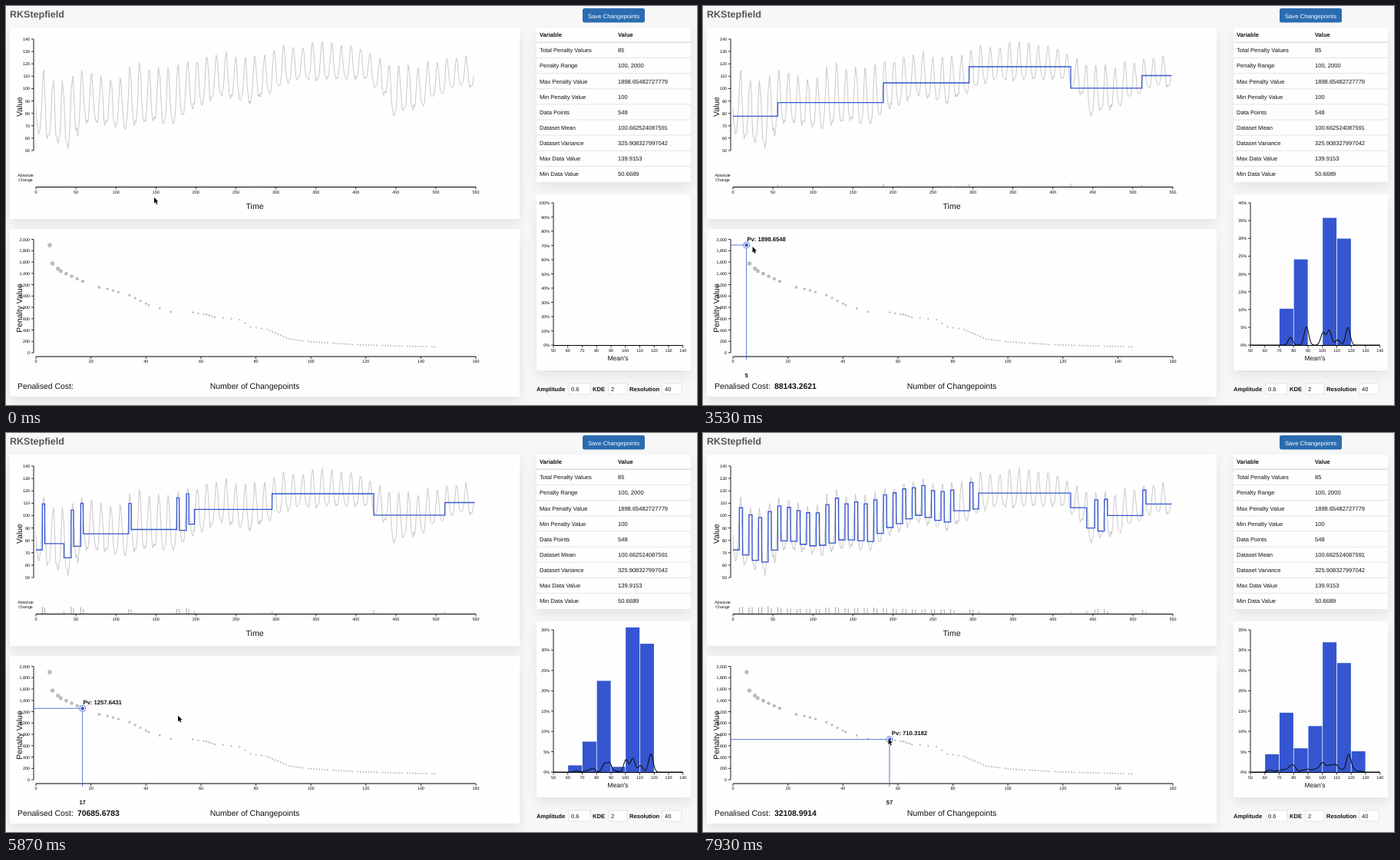
An HTML page with a canvas that plays this animation: 900 px wide and 519 px high, repeating every 8000 ms.

```html
<!DOCTYPE html>
<html lang="en">
<head>
<meta charset="utf-8">
<title>Changepoint explorer</title>
<style>
  html, body { margin: 0; width: 100%; height: 100%; overflow: hidden; background: #f7f7f7; }
  canvas { display: block; width: 900px; height: 519px; }
</style>
</head>
<body>
<canvas id="stage" width="900" height="519"></canvas>
<script>
const LOOP = 8000;
const BLUE = '#3556d0', INK = '#111', GREY = '#bbb';
const COUNT = 548;

const timeX = i => 39 + i * 1.0425;
const valueY = v => 43 + (140 - v) * 1.615;
const countX = n => 39 + n * 3.583;
const penaltyY = p => 451 - p * .07375;
const meanX = v => 713 + (v - 50) * 1.875;

const noise = i => {
  const s = Math.sin(i * 12.9898) * 43758.5453;
  return s - Math.floor(s) - .5;
};
const mean = list => list.reduce((a, b) => a + b, 0) / list.length;

// Linear interpolation between key points, held beyond both ends
function at(points, x, column = 1) {
  let i = points.findIndex(p => p[0] > x);
  if (i < 0) i = points.length;
  const a = points[Math.max(0, i - 1)], b = points[Math.min(i, points.length - 1)];
  const u = a === b ? 0 : (x - a[0]) / (b[0] - a[0]);
  return a[column] + (b[column] - a[column]) * u;
}

// Envelope of the yearly cycle: [year, high, low]
const ENVELOPE = [[0, 111, 64], [3, 103, 52], [5, 113, 74], [9, 107, 69], [11, 118, 74], [14, 113, 73],
  [16, 124, 87], [19, 131, 97], [22, 126, 92], [25, 133, 103], [27, 138, 108], [34, 136, 109],
  [36, 123, 98], [37, 121, 81], [40, 118, 90], [43, 126, 103]];
const REGIMES = [0, 56, 188, 295, 422, 511];
const REGIME_MEANS = [77.8, 88.9, 104.7, 117.7, 100.4, 110.6];

const series = Array.from({ length: COUNT }, (_, i) => {
  const month = (i + 3) % 12, year = Math.floor((i + 3) / 12);
  const peak = month < 6 ? year : year + 1;
  const high = at(ENVELOPE, peak, 1) + 5 * noise(peak), low = at(ENVELOPE, year, 2);
  const season = ((1 + Math.cos((month - .5) * Math.PI / 6)) / 2) ** 2;
  return low + (high - low) * (season + .16 * noise(i + 99));
});

// One constant level per stretch between changepoints
function fit(breaks) {
  const starts = [0, ...breaks].sort((a, b) => a - b);
  return starts.map((from, i) => {
    const to = starts[i + 1] ?? COUNT;
    return { from, to, level: mean(series.slice(from, to)) };
  });
}

fit(REGIMES.slice(1)).forEach(({ from, to, level }, r) => {
  for (let i = from; i < to; i++) series[i] += REGIME_MEANS[r] - level;
});

// Changepoints on both sides of the peaks of some years
const peaks = (years, width) => years.flatMap(k => [8 + 12 * k, 8 + 12 * k + width]);
const firstYears = [...Array(23).keys()];

const SELECTIONS = [
  { at: 1470, n: 5, pv: 1898.6548, cost: '88143.2621', max: 40, steps: fit(REGIMES.slice(1)) },
  { at: 4740, n: 17, pv: 1257.6431, cost: '70685.6783', max: 35,
    steps: fit([35, 198, 295, 422, 511, ...peaks([0, 3, 4, 9, 14, 15], 3)]) },
  { at: 7380, n: 57, pv: 710.3182, cost: '32108.9914', max: 35,
    steps: fit([307, 422, 442, ...peaks([...firstYears, 24, 37, 38, 42], 4)]) }
];

// Scatter outline: [changepoints, penalty, spacing of the dots that follow]
const PENALTIES = [[5, 1898, 1], [6, 1573, 2], [9, 1440, 2], [17, 1258, 6], [23, 1153, 3], [26, 1125, 2],
  [30, 1070, 4], [34, 1015, 2], [41, 840, 4], [49, 720, 8], [57, 711, 2], [62, 675, 1], [65, 625, 3],
  [74, 583, 2], [78, 455, 2], [84, 410, 1], [92, 243, 1], [100, 192, 1], [118, 138, 1], [146, 102, 1]];

// Pointer stops: [time, x, y]
const POINTER = [[270, 193, 249], [1070, 66, 306], [1270, 58.5, 309.5], [3270, 58.5, 309.5], [3530, 64.5, 313],
  [4530, 99.5, 356.5], [5000, 99.5, 356.5], [5870, 224, 367.5], [6700, 241.5, 397.5]];

const canvas = document.getElementById('stage');
let ctx = canvas.getContext('2d');

function text(str, x, y, size, { align = 'left', bold = false, color = INK } = {}) {
  ctx.font = `${bold ? 'bold ' : ''}${size}px "Liberation Sans", Arial, sans-serif`;
  ctx.textRendering = 'geometricPrecision';
  ctx.textAlign = align;
  ctx.fillStyle = color;
  ctx.fillText(str, x, y);
}

function line(points, color, width) {
  ctx.beginPath();
  points.forEach(([x, y]) => ctx.lineTo(x, y));
  ctx.strokeStyle = color;
  ctx.lineWidth = width;
  ctx.stroke();
}

function dot(x, y, r, color) {
  ctx.beginPath();
  ctx.arc(x, y, r, 0, 7);
  ctx.fillStyle = color;
  ctx.fill();
}

function upright(str, x, y) {
  ctx.save();
  ctx.translate(x, y);
  ctx.rotate(-Math.PI / 2);
  text(str, 0, 0, 10.4, { align: 'center' });
  ctx.restore();
}

function axisX(y, x0, x1, from, to, step) {
  line([[x0, y], [x1, y]], '#000', 1);
  for (let v = from; v <= to; v += step) {
    const x = x0 + (v - from) / (to - from) * (x1 - x0);
    line([[x, y], [x, y + 3]], '#000', .8);
    text(v, x, y + 8.1, 5.4, { align: 'center', color: '#000' });
  }
}

function axisY(x, y0, y1, from, to, step, format = String) {
  line([[x, y0], [x, y1]], '#000', .9);
  for (let v = from; v <= to; v += step) {
    const y = y0 + (v - from) / (to - from) * (y1 - y0);
    line([[x - 3, y], [x, y]], '#000', .8);
    text(format(v), x - 5, y + 2, 5.4, { align: 'right', color: '#000' });
  }
}

function box(x, y, w, h, radius, fill) {
  ctx.beginPath();
  ctx.roundRect(x, y, w, h, radius);
  ctx.fillStyle = fill;
  ctx.fill();
}

function card(x, y, w, h) {
  ctx.save();
  ctx.shadowColor = 'rgba(0,0,0,.08)';
  ctx.shadowBlur = 15;
  ctx.shadowOffsetY = 7;
  box(x, y, w, h, 1, '#fefefe');
  ctx.restore();
}

function drawDots() {
  PENALTIES.slice(0, -1).forEach(([from, , step], i) => {
    for (let n = from; n < PENALTIES[i + 1][0]; n += step) {
      if (n > 92 && n % 9 === 8) continue;
      dot(countX(n), penaltyY(at(PENALTIES, n)), 1 + 1.8 * Math.exp((5 - n) / 26), GREY);
    }
  });
}

function drawTable() {
  const rows = [['Variable', 'Value'], ['Total Penalty Values', '85'], ['Penalty Range', '100, 2000'],
    ['Max Penalty Value', '1898.65482727779'], ['Min Penalty Value', '100'], ['Data Points', '548'],
    ['Dataset Mean', '100.662524087591'], ['Dataset Variance', '325.908327997042'],
    ['Max Data Value', '139.9153'], ['Min Data Value', '50.6689']];
  rows.forEach(([name, value], i) => {
    const y = 40.2 + 20.14 * i, rule = 47.3 + 20.14 * i;
    text(name, 695, y, 7.55, { bold: !i });
    text(value, 797, y, 7.55, { bold: !i });
    if (i < rows.length - 1) line([[691, rule], [892, rule]], '#dcdfe2', i ? .8 : 1.4);
  });
}

function field(label, labelX, value, x, w) {
  text(label, labelX, 501, 7.6, { bold: true });
  box(x, 491, w, 14, 1, '#fff');
  ctx.strokeStyle = '#ddd';
  ctx.lineWidth = .8;
  ctx.strokeRect(x, 491, w, 14);
  text(value, x + 3, 501, 7.5);
}

function drawBackdrop() {
  ctx.fillStyle = '#f7f7f7';
  ctx.fillRect(0, 0, 900, 519);
  card(5, 28, 664, 249);
  card(5, 290, 664, 218);
  card(691, 28, 201, 201);
  card(691, 245, 201, 229);

  text('RKStepfield', 5, 15.3, 12.5, { bold: true, color: '#555' });
  box(751, 3, 81, 18.5, 2.5, '#2b6cb0');
  text('Save Changepoints', 791.5, 15.5, 7.7, { align: 'center', color: '#fff' });

  axisY(36, 188, 43, 50, 140, 10);
  axisX(235.5, 39, 612, 0, 550, 50);
  text('Time', 324, 263.5, 10.5, { align: 'center' });
  upright('Value', 20.5, 131);
  text('Absolute', 25.5, 222, 5.3, { align: 'center' });
  text('Change', 25.5, 227.5, 5.3, { align: 'center' });
  line(series.map((v, i) => [timeX(i), valueY(v)]), GREY, .8);

  axisY(36, 451, 303.5, 0, 2000, 200, v => v.toLocaleString('en-US'));
  axisX(456, 39, 612, 0, 160, 20);
  upright('Penalty Value', 21, 393);
  text('Penalised Cost:', 15, 498, 10.4);
  text('Number of Changepoints', 324, 498, 10.5, { align: 'center' });
  drawDots();

  drawTable();
  text("Mean's", 797, 460.5, 8.5, { align: 'center' });
  field('Amplitude', 691, '0.6', 733, 28);
  field('KDE', 764, '2', 785, 24);
  field('Resolution', 812, '40', 855, 25);
}

function drawSteps(steps) {
  const path = [];
  steps.forEach(({ from, to, level }, i) => {
    const x = timeX(from), y = valueY(level);
    path.push([x, y], [timeX(to), y]);
    if (i) {
      const jump = Math.abs(level - steps[i - 1].level);
      line([[x, 235], [x, 235 - .24 * jump]], '#999', .9);
    }
  });
  line(path, BLUE, 1.3);
}

function drawMarker({ n, pv, cost }) {
  const x = countX(n) - .3, y = penaltyY(pv);
  line([[36, y], [x - 4, y]], BLUE, .8);
  line([[x, y + 4], [x, 460]], BLUE, .8);
  dot(x, y, 4.3, BLUE);
  dot(x, y, 3.5, '#fff');
  dot(x, y, 2.3, BLUE);
  text('Pv: ' + pv, x + 26, y - 5.3, 7.7, { align: 'center', bold: true });
  text(n, x, 482.5, 7.5, { align: 'center', bold: true });
  text(cost, 93, 498, 10.35, { bold: true });
}

// Bars and density curve both weigh each level by the length of its stretch
function drawHistogram(steps, max, tick) {
  const weigh = kernel => steps.reduce((sum, { from, to, level }) => sum + (to - from) * kernel(level), 0);
  ctx.fillStyle = BLUE;
  for (let bin = 50; bin < 140; bin += 10) {
    const share = 100 * weigh(v => v >= bin && v < bin + 10 ? 1 : 0) / COUNT;
    const h = share / max * 185;
    ctx.fillRect(meanX(bin) + .4, 441 - h, 18, h);
  }
  axisY(713, 441, 256, 0, max, tick, v => v + '%');
  axisX(441.5, 713, 881.7, 50, 140, 10);
  if (!steps.length) return;
  const curve = [];
  for (let v = 50; v <= 140; v += .5) {
    curve.push([meanX(v), 441 - .18 * weigh(level => Math.exp(-(((v - level) / 2.2) ** 2)))]);
  }
  line(curve, '#111', 1.1);
}

function drawPointer(t) {
  ctx.save();
  ctx.translate(at(POINTER, t, 1), at(POINTER, t, 2));
  ctx.beginPath();
  [[0, 0], [0, 7.6], [1.7, 6.1], [2.9, 8.9], [4.2, 8.3], [3, 5.6], [5.3, 5.5]].forEach(([x, y]) => ctx.lineTo(x, y));
  ctx.closePath();
  ctx.lineJoin = 'round';
  ctx.lineWidth = 1;
  ctx.strokeStyle = '#fff';
  ctx.stroke();
  ctx.fillStyle = '#000';
  ctx.fill();
  ctx.restore();
}

// The unchanging parts are painted once
const screen = ctx;
const backdrop = document.createElement('canvas');
backdrop.width = 900;
backdrop.height = 519;
ctx = backdrop.getContext('2d');
drawBackdrop();
ctx = screen;

const start = performance.now();
function frame() {
  const t = (performance.now() - start) % LOOP;
  const current = SELECTIONS.filter(s => t >= s.at).pop();
  ctx.drawImage(backdrop, 0, 0);
  if (current) {
    drawSteps(current.steps);
    drawMarker(current);
    drawHistogram(current.steps, current.max, 5);
  } else {
    drawHistogram([], 100, 10);
  }
  drawPointer(t);
  requestAnimationFrame(frame);
}
frame();
</script>
</body>
</html>
```
